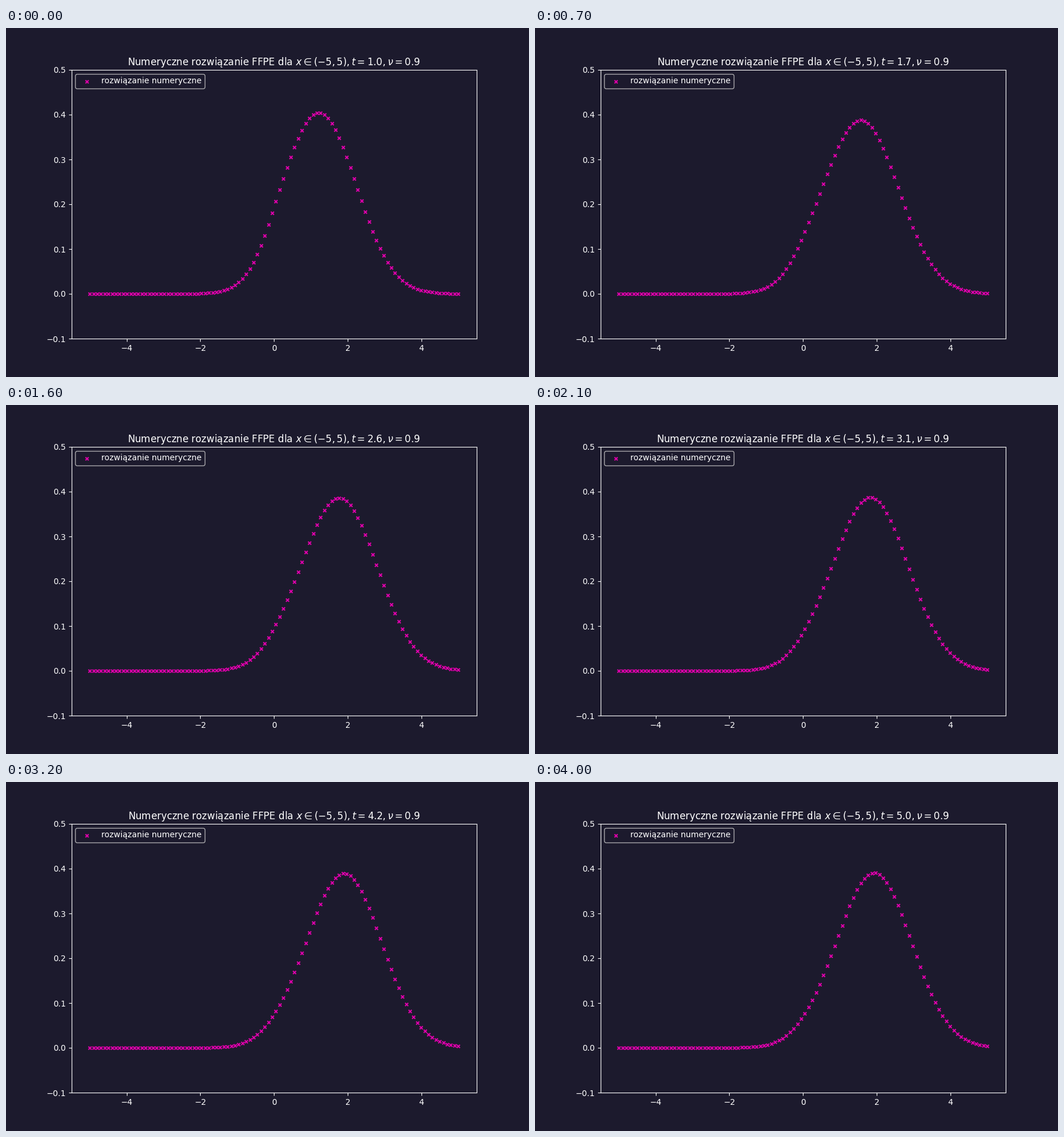
Write a matplotlib script that moves like this. It is 900 px wide and 600 px high and loops after 4.1 s.

```python
import numpy as np
import matplotlib.pyplot as plt
from matplotlib.animation import FuncAnimation

BACK = "#1c1a2d"
MARK = "#e000ac"
NU = 0.9            # order of the time derivative
CENTER = 2.0        # centre of the restoring force
START_VAR = 0.0625  # variance of the narrow starting pulse at x = 0
MODES = 160
FRAMES = 41

plt.rcParams.update({
    "font.family": "DejaVu Sans",
    "text.color": "white",
    "axes.labelcolor": "white",
    "axes.edgecolor": "white",
    "axes.facecolor": BACK,
    "figure.facecolor": BACK,
    "savefig.facecolor": BACK,
    "xtick.color": "white",
    "ytick.color": "white",
})


def hermite(x):
    """Normalised probabilists' Hermite polynomials, one row per mode."""
    x = np.atleast_1d(x)
    rows = [np.ones_like(x), x]
    for n in range(1, MODES - 1):
        rows.append((x * rows[n] - np.sqrt(n) * rows[n - 1]) / np.sqrt(n + 1))
    return np.array(rows)


# Spectral form of the Mittag-Leffler relaxation, on a log grid of rates.
log_rate, step = np.linspace(-28, 8, 1600, retstep=True)
rate = np.exp(log_rate)
power = rate ** NU
weight = step / np.pi * power * np.sin(NU * np.pi) / (
    power ** 2 + 2 * power * np.cos(NU * np.pi) + 1)


def relaxation(t):
    """E_nu(-n t^nu) for every mode n."""
    scaled = np.arange(1, MODES) ** (1 / NU) * t
    decay = np.exp(-np.outer(scaled, rate)) @ weight
    return np.concatenate([[1.0], decay])


x = np.linspace(-5, 5, 100)
z = x - CENTER
q = np.sqrt(1 - START_VAR)
coef = q ** np.arange(MODES) * hermite(-CENTER / q)[:, 0]
basis = hermite(z) * np.exp(-z ** 2 / 2) / np.sqrt(2 * np.pi)


def density(t):
    return (coef * relaxation(t)) @ basis


def title(t):
    return ("Numeryczne rozwiązanie FFPE dla "
            rf"$x\in(-5,5), t={t:.1f}, \nu={NU}$")


fig, ax = plt.subplots(figsize=(9, 6), dpi=100)
dots = ax.scatter(x, density(1.0), s=15, marker="x", color=MARK,
                  label="rozwiązanie numeryczne")
ax.set_xlim(-5.5, 5.5)
ax.set_ylim(-0.1, 0.5)
ax.legend(loc="upper left")
heading = ax.set_title(title(1.0))


def update(i):
    t = 1 + i / 10
    dots.set_offsets(np.column_stack([x, density(t)]))
    heading.set_text(title(t))
    return dots, heading


anim = FuncAnimation(fig, update, frames=FRAMES, interval=100, repeat=True)
plt.show()
```
